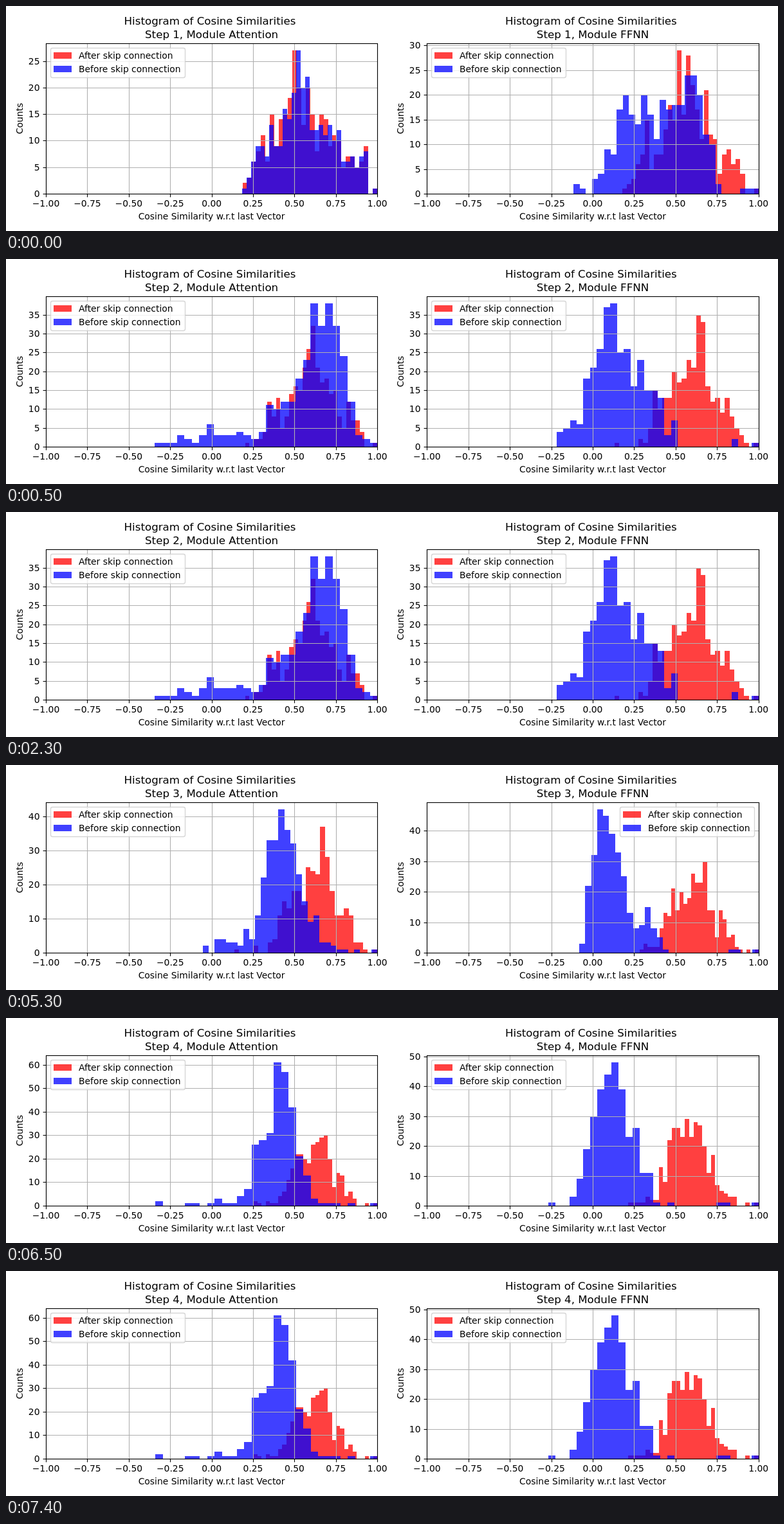
An HTML page with a canvas for the animation above (8000 ms loop, 1200 by 350 pixels).

```html
<!DOCTYPE html>
<html lang="en">
<head>
<meta charset="utf-8">
<title>Cosine similarity histograms</title>
<style>
  html, body { margin: 0; width: 100%; height: 100%; overflow: hidden; background: #fff; }
  canvas { display: block; }
</style>
</head>
<body>
<canvas id="stage" width="1200" height="350"></canvas>
<script>
const ctx = document.getElementById('stage').getContext('2d');
const TOP = 58, BOTTOM = 292;
const RED = 'rgba(255,0,0,.75)', BLUE = 'rgba(0,0,255,.75)';
const LOOP = 8000, STEP_STARTS = [0, 500, 3500, 6500];

// Equal-width bins reaching from min to 1.
const hist = (min, ...counts) => ({ min, counts });

const attention = [
  {
    after: hist(.188, 2, 3, 6, 8, 11, 6, 15, 9, 14, 15, 18, 27, 20, 13, 20, 15, 8, 15, 14, 9, 11, 10, 5, 7, 7, 5, 6, 9, 0, 1),
    before: hist(.184, 1, 3, 6, 9, 9, 7, 13, 9, 9, 16, 14, 19, 27, 20, 22, 12, 12, 13, 11, 13, 10, 12, 6, 6, 7, 5, 7, 8, 0, 1)
  },
  {
    after: hist(.2015, 1, 0, 2, 2, 4, 12, 8, 13, 5, 8, 14, 16, 15, 21, 26, 32, 21, 17, 18, 14, 15, 8, 5, 12, 7, 7, 4, 0, 0, 1),
    before: hist(-.344, 1, 1, 1, 3, 2, 1, 3, 6, 3, 3, 3, 4, 3, 2, 4, 11, 10, 12, 12, 18, 23, 38, 32, 38, 32, 24, 12, 3, 2, 1)
  },
  {
    after: hist(.137, 1, 0, 0, 0, 2, 0, 0, 3, 4, 11, 15, 13, 18, 18, 14, 25, 24, 23, 37, 28, 18, 11, 11, 13, 11, 3, 3, 1, 0, 1),
    before: hist(-.053, 2, 0, 4, 4, 3, 3, 2, 7, 4, 11, 22, 33, 33, 42, 36, 32, 23, 15, 9, 11, 3, 3, 2, 1, 1, 0, 1, 0, 0, 1)
  },
  {
    after: hist(.252, 2, 1, 0, 2, 1, 1, 4, 6, 11, 16, 22, 22, 20, 18, 26, 27, 29, 30, 20, 8, 14, 13, 4, 6, 3, 0, 0, 1, 0, 1),
    before: hist(-.34, 2, 0, 0, 0, 1, 1, 0, 1, 3, 1, 1, 4, 7, 26, 28, 31, 61, 57, 42, 21, 13, 3, 1, 1, 1, 0, 1, 0, 0, 1)
  }
];

const ffnn = [
  {
    after: hist(.1785, 1, 2, 3, 6, 8, 15, 5, 8, 8, 13, 18, 15, 29, 16, 28, 22, 17, 11, 21, 12, 11, 4, 8, 9, 6, 7, 4, 0, 0, 1),
    before: hist(-.1164, 2, 1, 0, 3, 4, 9, 8, 17, 20, 16, 14, 20, 16, 11, 19, 17, 18, 18, 24, 24, 20, 12, 10, 2, 0, 0, 0, 1, 1, 1)
  },
  {
    after: hist(.13, 1, 0, 0, 0, 0, 2, 1, 5, 15, 10, 13, 13, 20, 17, 18, 23, 21, 35, 33, 16, 12, 13, 9, 13, 8, 5, 3, 1, 0, 1),
    before: hist(-.219, 4, 5, 7, 6, 18, 21, 26, 37, 38, 25, 26, 16, 23, 15, 15, 13, 3, 7, 0, 0, 0, 0, 0, 0, 0, 0, 2, 0, 0, 1)
  },
  {
    after: hist(.283, 1, 3, 2, 2, 2, 8, 13, 12, 21, 14, 20, 16, 18, 26, 23, 23, 30, 14, 14, 5, 14, 11, 5, 6, 2, 1, 0, 1, 0, 1),
    before: hist(-.0815, 3, 22, 32, 47, 45, 39, 33, 25, 13, 8, 9, 15, 8, 5, 1, 0, 0, 0, 0, 0, 0, 0, 0, 0, 0, 1, 1, 0, 0, 1),
    legendRight: true
  },
  {
    after: hist(.215, 1, 1, 1, 1, 3, 2, 2, 13, 8, 22, 26, 26, 23, 29, 23, 28, 27, 20, 11, 17, 7, 5, 4, 3, 3, 0, 0, 1, 0, 1),
    before: hist(-.268, 1, 0, 0, 3, 9, 19, 30, 39, 44, 48, 39, 23, 26, 11, 11, 1, 0, 1, 0, 0, 0, 0, 0, 0, 1, 1, 0, 0, 0, 1)
  }
];

function text(str, x, y, align = 'center', size = 13.889) {
  ctx.font = `${size}px "DejaVu Sans", sans-serif`;
  ctx.textAlign = align;
  ctx.fillStyle = '#000';
  ctx.fillText(str, x, y);
}

function line(x1, y1, x2, y2, color) {
  ctx.strokeStyle = color;
  ctx.lineWidth = 1.11;
  ctx.beginPath();
  ctx.moveTo(x1, y1);
  ctx.lineTo(x2, y2);
  ctx.stroke();
}

function drawBars({ min, counts }, color, toX, toY) {
  const width = (1 - min) / counts.length;
  ctx.fillStyle = color;
  counts.forEach((count, i) => {
    const left = Math.round(toX(min + i * width));
    const right = Math.round(toX(min + (i + 1) * width));
    const top = Math.round(toY(count));
    ctx.fillRect(left, top, right - left, BOTTOM - top);
  });
}

function drawLegend(x) {
  ctx.beginPath();
  ctx.roundRect(x + .5, 65.5, 209, 46, 2.8);
  ctx.fillStyle = 'rgba(255,255,255,.8)';
  ctx.fill();
  ctx.strokeStyle = 'rgba(204,204,204,.8)';
  ctx.lineWidth = 1.39;
  ctx.stroke();
  [['After', RED], ['Before', BLUE]].forEach(([name, color], i) => {
    ctx.fillStyle = color;
    ctx.fillRect(x + 5, 72 + 21 * i, 28, 10);
    text(name + ' skip connection', x + 44, 82 + 21 * i, 'left');
  });
}

function drawPanel(name, step, x0, width, { after, before, legendRight }) {
  const yMax = 1.05 * Math.max(...after.counts, ...before.counts);
  const toX = v => x0 + (v + 1) * width / 2;
  const toY = v => BOTTOM - v / yMax * (BOTTOM - TOP);
  const left = Math.round(x0), right = Math.round(x0 + width), middle = x0 + width / 2;

  drawBars(after, RED, toX, toY);
  drawBars(before, BLUE, toX, toY);

  for (let v = -1; v <= 1; v += .25) {
    const x = Math.round(toX(v)) + .5;
    line(x, TOP, x, BOTTOM, '#b0b0b0');
    line(x, BOTTOM, x, BOTTOM + 5.4, '#000');
    text(v.toFixed(2).replace('-', '\u2212'), toX(v), 312);
  }
  for (let v = 0; v < yMax; v += yMax > 40 ? 10 : 5) {
    const y = Math.round(toY(v)) + .5;
    line(left, y, right, y, '#b0b0b0');
    line(left - 4.4, y, left, y, '#000');
    text(v, left - 9.5, y + 4.5, 'right');
  }
  ctx.strokeStyle = '#000';
  ctx.strokeRect(left + .5, TOP + .5, right - left, BOTTOM - TOP);

  text('Histogram of Cosine Similarities', middle - 2.65, 29, 'center', 16.667);
  text(`Step ${step}, Module ${name}`, middle, 50, 'center', 16.667);
  text('Cosine Similarity w.r.t last Vector', middle, 332);
  ctx.save();
  ctx.translate(left - 36, (TOP + BOTTOM) / 2);
  ctx.rotate(-Math.PI / 2);
  text('Counts', 0, 0);
  ctx.restore();

  drawLegend(legendRight ? right - 216 : left + 7);
}

function render(now) {
  const t = now % LOOP;
  const index = STEP_STARTS.filter(start => start <= t).length - 1;
  ctx.fillStyle = '#fff';
  ctx.fillRect(0, 0, 1200, 350);
  drawPanel('Attention', index + 1, 62, 515.2, attention[index]);
  drawPanel('FFNN', index + 1, 654.3, 515.4, ffnn[index]);
}

const origin = performance.now();
function tick() {
  render(performance.now() - origin);
  requestAnimationFrame(tick);
}
tick();
</script>
</body>
</html>
```
